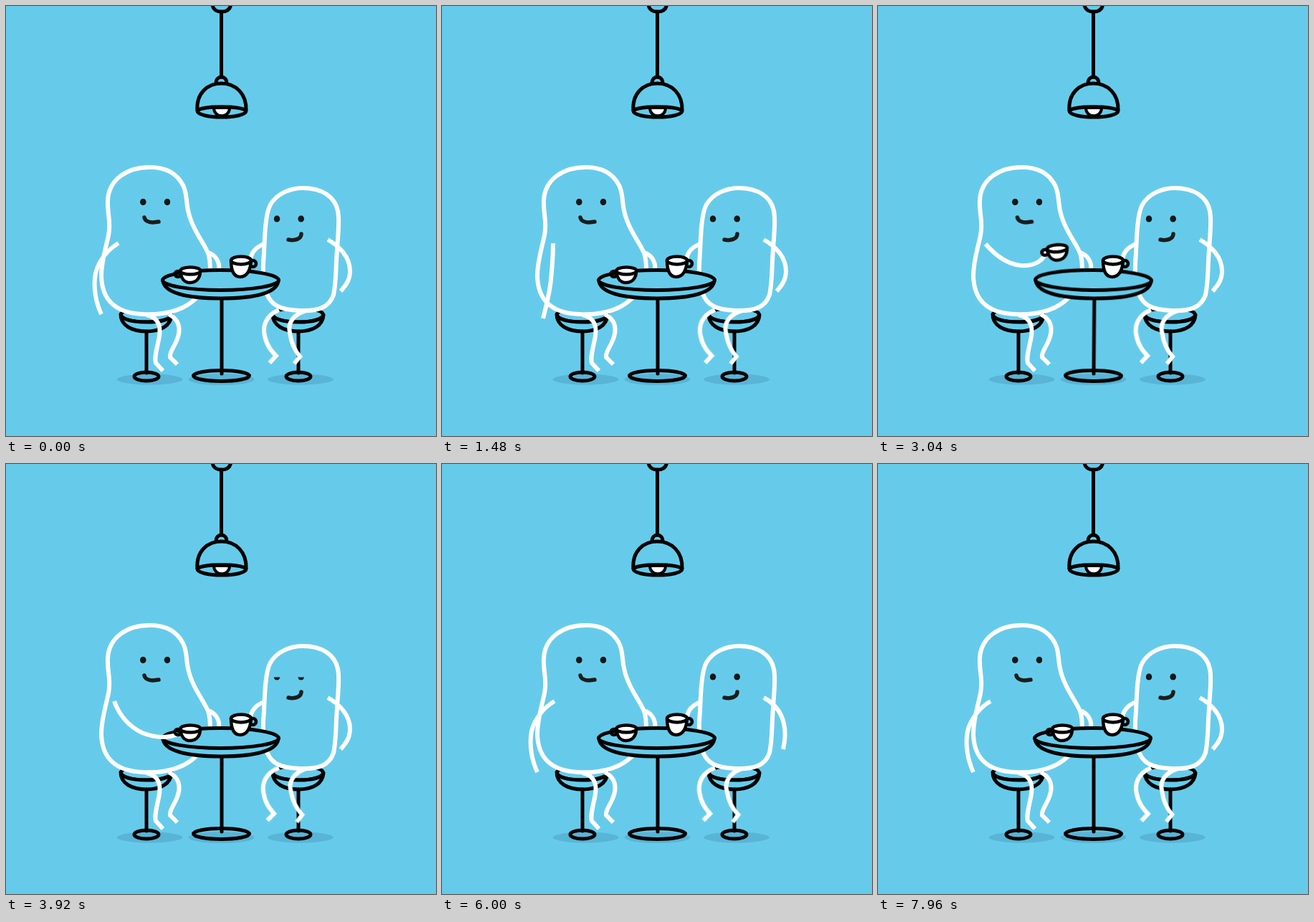
Recreate the animation shown at these times as an HTML page. Size 600 by 600 pixels, loop 8000 ms.

```html
<!DOCTYPE html>
<html lang="en">
<head>
<meta charset="utf-8">
<title>Coffee for two</title>
<style>
  html, body { margin: 0; width: 100%; height: 100%; overflow: hidden; background: #66cbea; }
  svg { display: block; width: 100vw; height: 100vh; }

  .ink { fill: none; stroke: #000; stroke-width: 5; stroke-linecap: round; stroke-linejoin: round; }
  .sky { fill: #66cbea; }
  .milk { fill: #fff; }
  .chalk { fill: none; stroke: #fff; stroke-width: 6; stroke-linejoin: miter; }
  .body { fill: #66cbea; }
  .mouth { fill: none; stroke: #1c1c1c; stroke-width: 5.5; stroke-linecap: round; }
  .eyes { fill: #161616; }
  .shadow { fill: #59b4d6; }
  .cup { stroke-width: 4.5; }

  .loop { animation: 8s ease-in-out infinite; }
  #reach { animation-name: reach; }
  #sip { animation-name: sip; transform-origin: 257px 375px; }
  #table { animation-name: lean; transform-origin: 300px 516px; }
  #smile { animation-name: smile; }
  #swing { animation-name: swing; }
  #nudge { animation-name: nudge; }
  #blinkL { animation-name: blinkL; }
  #blinkR { animation-name: blinkR; }

  .leg { animation: kick 800ms cubic-bezier(.6, 0, .4, 1) -1440ms infinite alternate; }
  #legA { --turn: 3deg; transform-origin: 381px 424px; }
  #legB { --turn: -3.3deg; transform-origin: 418px 425px; }
  @keyframes kick { to { transform: rotate(var(--turn)); } }

  /* shoulder to hand: rest, forward, grab the cup, sip, put down, swing back */
  @keyframes reach {
    0%, 11%, 63%, 100% { d: path("M157,331 C143,339 129,355 125,373 C121,393 126,415 133,430"); }
    18.5% { d: path("M155,331 C155,347 154,362 152,382 C150,402 145,420 141,436"); animation-timing-function: ease-in; }
    21.5% { d: path("M152,331 C152,355 160,380 175,392 C190,402 205,400 218,398"); animation-timing-function: ease-out; }
    24%, 24.5% { d: path("M151,331 C158,350 171,366 190,375 C205,381 222,384 240,377"); animation-timing-function: ease-in; }
    27% { d: path("M150,332 C163,347 180,360 199,362 C215,363 228,359 236,342"); animation-timing-function: ease-out; }
    30%, 34.5% { d: path("M150,332 C158,352 170,360 181,350 C190,342 192,325 197,307"); animation-timing-function: ease-in; }
    38% { d: path("M150,332 C163,347 180,360 199,362 C215,363 228,359 236,342"); animation-timing-function: ease-out; }
    42%, 53% { d: path("M151,331 C158,350 171,366 190,375 C205,381 222,384 240,377"); animation-timing-function: ease-in; }
    55.5% { d: path("M155,331 C155,347 154,362 152,382 C150,402 145,420 141,436"); animation-timing-function: ease-out; }
    58% { d: path("M157,331 C140,335 121,349 115,368 C111,387 112,408 118,424"); }
    61% { d: path("M157,331 C143,339 128,355 124,373 C120,393 124,413 128,428"); }
  }
  @keyframes sip {
    0%, 24.5% { transform: none; animation-timing-function: ease-in; }
    27% { transform: translate(-7px, -31.5px) rotate(-4deg); animation-timing-function: ease-out; }
    30%, 34.5% { transform: translate(-42px, -68px) rotate(-14deg); animation-timing-function: ease-in; }
    38% { transform: translate(-7px, -31.5px) rotate(-4deg); animation-timing-function: ease-out; }
    42%, 100% { transform: none; }
  }
  @keyframes lean {
    0%, 24%, 43%, 100% { transform: none; }
    27%, 39% { transform: rotate(.45deg); }
  }
  @keyframes smile {
    0%, 26%, 43%, 100% { transform: none; }
    30%, 39% { transform: translate(1.5px, 0); }
  }
  @keyframes swing {
    0%, 57.5%, 94%, 100% { d: path("M449,326 C465,335 480,350 480,370 C480,382 474,390 467,398"); }
    72%, 78% { d: path("M449,326 C462,333 473,345 477,362 C480,375 479,385 476,398"); }
  }
  @keyframes nudge {
    0%, 57.5%, 94%, 100% { transform: none; }
    72%, 78% { transform: translate(.6px, 0); }
  }
  @keyframes blinkL {
    0%, 11.5%, 14.5%, 56%, 59%, 100% { clip-path: inset(0); }
    13%, 57.5% { clip-path: inset(80% 0 0 0); }
  }
  @keyframes blinkR {
    0%, 48%, 51%, 78.5%, 81.5%, 100% { clip-path: inset(0); }
    49.5%, 80% { clip-path: inset(70% 0 0 0); }
  }
</style>
</head>
<body>
<svg viewBox="0 0 600 600">
  <defs>
    <g id="stool" class="ink">
      <ellipse cx="195.5" cy="431" rx="35" ry="10"/>
      <path class="sky" d="M160,430 C160,446 176,454 196,454 C216,454 230,446 231,431 C229,438 217,441 196,441 C175,441 161,437 160,430Z"/>
      <path d="M196,454 V512"/>
      <ellipse cx="196" cy="517" rx="17" ry="6"/>
    </g>
  </defs>

  <rect class="sky" width="600" height="600"/>
  <g class="shadow">
    <ellipse cx="200.5" cy="521" rx="46" ry="7.5"/>
    <ellipse cx="300.5" cy="521" rx="46" ry="8"/>
    <ellipse cx="411" cy="521" rx="46" ry="7.5"/>
  </g>

  <!-- lamp -->
  <g class="ink">
    <path d="M288,-3 C288,4 293,8 301,8 C309,8 313,4 314,-3"/>
    <path d="M300.5,8 V99"/>
    <path d="M293,108 C293,96 308,96 308,108"/>
    <path d="M267,146 C265,122 281,108 300.5,108 C321,108 336,123 335,146"/>
    <path class="milk" d="M290,142 C290,157 312,157 312,142Z" stroke-width="4"/>
    <path d="M267,146 C275,139 326,139 335,146 C336,158 266,158 267,146Z"/>
  </g>

  <use href="#stool"/>
  <use href="#stool" x="212"/>

  <!-- left guest -->
  <g class="chalk">
    <path d="M281,344 C291,346 299,356 297,369"/>
    <path class="body" d="M201,225 C170,225 143,241 142,272 C141,290 147,300 143,320 C138,343 133,357 133,377 C134,408 150,428 190,430 C225,432 255,423 272,400 C285,385 287,365 283,348 C280,335 259,312 254,285 C251,273 253,262 247,250 C238,233 222,225 201,225Z"/>
    <path d="M196,431 C214,435 217,448 213,466 C210,480 207,490 209,498 L219,509"/>
    <path d="M227,430 C242,437 245,451 238,467 C234,477 228,483 229,490 L239,500"/>
  </g>
  <g id="blinkL" class="loop eyes">
    <ellipse cx="191.3" cy="273.5" rx="4.3" ry="4.7"/>
    <ellipse cx="225" cy="273.5" rx="4.3" ry="4.7"/>
  </g>
  <path id="smile" class="loop mouth" d="M193,295 C194,300 200,302 205,302 L213,301"/>

  <!-- right guest -->
  <g class="chalk">
    <path id="nudge" class="loop" d="M360,332 C347,337 341,346 341,357"/>
    <path class="body" d="M414,254 C396,254 378,262 369,277 C362,289 361,320 360,345 C358,370 358,388 364,402 C370,416 380,424 410,425 C435,426 451,421 457,403 C461,385 460,365 462,340 C463,320 466,300 463,286 C459,266 441,254 414,254Z"/>
    <path id="legA" class="leg" d="M381,424 C362,432 358,447 361,460 C364,474 370,481 377,488 L368,498"/>
    <path id="legB" class="leg" d="M419,425 C400,430 393,443 396,456 C398,472 403,481 410,489 L402,499"/>
    <path id="swing" class="loop" d="M449,326 C465,335 480,350 480,370 C480,382 474,390 467,398"/>
  </g>
  <g id="blinkR" class="loop eyes">
    <ellipse cx="378" cy="297" rx="4.3" ry="4.7"/>
    <ellipse cx="411.7" cy="297" rx="4.3" ry="4.7"/>
  </g>
  <path class="mouth" d="M394,326 C403,328 412,325 412,318"/>

  <g id="table" class="loop ink">
    <path d="M301,409 V513"/>
    <ellipse cx="300.5" cy="516" rx="39" ry="7.5"/>
    <path class="sky" d="M219,382 C219,400 252,408 300,408 C348,408 380,400 380,382Z"/>
    <ellipse class="sky" cx="299.5" cy="382.5" rx="81" ry="14"/>
  </g>

  <path id="reach" class="loop chalk" d="M157,331 C143,339 129,355 125,373 C121,393 126,415 133,430"/>

  <g id="sip" class="loop">
    <g class="ink cup">
      <ellipse cx="240" cy="374" rx="4.5" ry="4"/>
      <path class="milk" d="M243.500,370 C244,380 249,386 257,386 C266,386 271,379 271,370Z"/>
      <ellipse class="milk" cx="257.300" cy="369.500" rx="14" ry="5"/>
    </g>
  </g>
  <g class="ink cup">
    <ellipse cx="344.500" cy="359.500" rx="4.500" ry="4.500"/>
    <path class="milk" d="M314,355 C314,370 318,378 327,378 C336,378 341,369 342,355Z"/>
    <ellipse class="milk" cx="328" cy="355" rx="14" ry="5.500"/>
  </g>
</svg>
</body>
</html>
```
